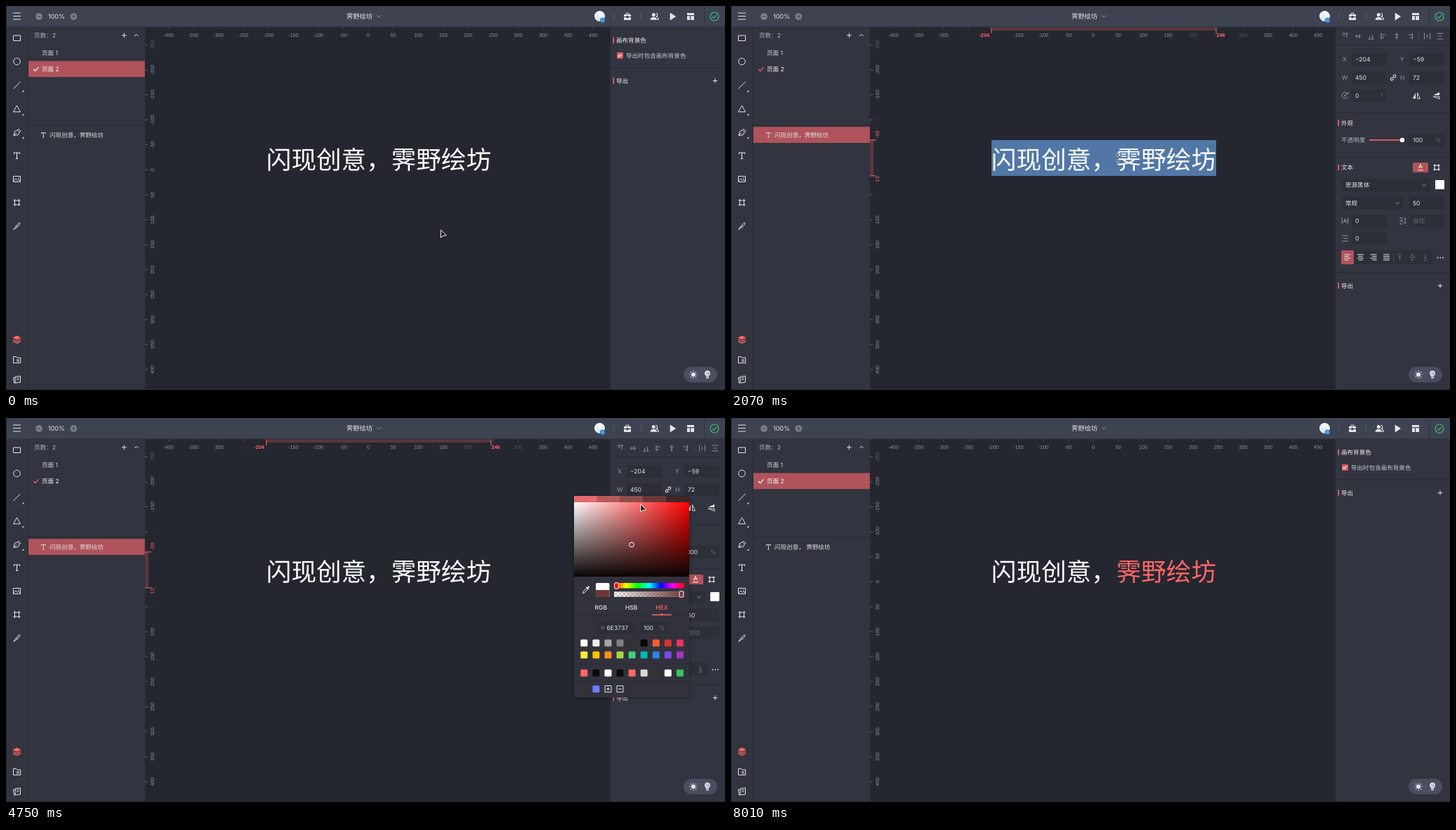
These frames come from a looping animation (1024 by 547 pixels, 8110 ms). An HTML page:

```html
<!DOCTYPE html>
<html lang="zh-CN">
<head>
<meta charset="utf-8">
<title>设计工具演示</title>
<style>
html, body { margin: 0; width: 100%; height: 100%; overflow: hidden; background: #252730; }
svg { position: fixed; inset: 0; width: 100%; height: 100%; display: block; }
text { font-family: Inter, "Noto Sans CJK SC", "Noto Sans CJK", sans-serif; text-rendering: geometricPrecision; white-space: pre; }
.ruler text { font-family: "Liberation Sans", Arial, sans-serif; }
.big { font-family: "Noto Sans CJK SC", "Noto Sans CJK", sans-serif; }
</style>
</head>
<body>
<svg id="stage" viewBox="0 0 1024 547"></svg>
<script>
const LOOP = 8110;
const SLOGAN = '闪现创意，', BRAND = '霁野绘坊';
const RED = '#ff6666', ROW = '#b0535b', PANEL = '#32343f', CANVAS = '#252730';
const FIELD = '#2c2e38', LINE = '#282a33', INK = '#e4e5e9', GREY = '#9698a1', DIM = '#6d707a';
const UNIT = 0.7115, SIZE = 50 * UNIT, ROW_H = 32 * UNIT;
const BOX = { x: 371, y: 191, w: 320, h: 51 };

// Markup helpers
const rect = (x, y, w, h, fill, more = '') => `<rect x="${x}" y="${y}" width="${w}" height="${h}" fill="${fill}" ${more}/>`;
const path = (d, stroke = INK, width = 1, fill = 'none') =>
  `<path d="${d}" stroke="${stroke}" stroke-width="${width}" fill="${fill}" stroke-linejoin="round"/>`;
const solid = (d, fill = INK) => path(d, 'none', 0, fill);
const dot = (x, y, r, fill, more = '') => `<circle cx="${x}" cy="${y}" r="${r}" fill="${fill}" ${more}/>`;
const label = (x, y, s, fill = INK, size = 8.55, more = '') =>
  `<text x="${x}" y="${y}" font-size="${size}" fill="${fill}" ${more}>${s}</text>`;
const at = (x, y, s, more = '') => `<g transform="translate(${x} ${y}) ${more}">${s}</g>`;
const group = (id, s) => `<g id="${id}">${s}</g>`;
const plus = (x, y) => path(`M${x - 3.3} ${y}h6.6M${x} ${y - 3.3}v6.6`);
const chevron = (x, y, dir = 1, c = GREY) => path(`M${x - 2.8} ${y - 1.4 * dir}l2.8 ${2.8 * dir} 2.8 ${-2.8 * dir}`, c);
const tick = (x, y, c, s = 1) => path(`M${x - 3.6 * s} ${y}l${2.6 * s} ${2.7 * s} ${4.8 * s} ${-5.4 * s}`, c, 1.2);
const heading = (y, s) => rect(864.5, y - 4.3, 1.6, 8.4, RED) + label(869, y + 3.2, s, '#f0f0f2', 8.55, 'font-weight="500"');
const rule = (y) => rect(861, y, 163, 1, LINE);

function topBar() {
  const mid = '#7d818d', bar = '#3e4352';
  return rect(0, 0, 1024, 30, bar) + rect(0, 29.5, 1024, 1, '#2a2c36') +
    path('M10 10h11M10 14.5h11M10 19h11') +
    dot(47, 15, 4.8, mid) + path('M44.5 15h5', bar) + label(60, 18.1, '100%', INK, 9) +
    dot(96.3, 15, 4.8, mid) + path('M93.8 15h5M96.3 12.5v5', bar) +
    label(485, 17.9, BRAND, INK, 9.25) + chevron(531, 14.6) +
    dot(845.5, 14.5, 7.5, 'url(#avatar)') + dot(849.6, 20.4, 3.4, '#3f9ff2', `stroke="${bar}" stroke-width=".6"`) +
    rect(865, 10, 1, 10, '#555a68') + rect(904, 10, 1, 10, '#555a68') + rect(994, 0, 1, 30, '#303440') +
    solid('M880 12h10v3h-3.6v-1h-2.8v1H880zM880 16h3.6v1.2h2.8V16h3.6v4h-10z') + path('M883 12v-1.8h4V12') +
    dot(922.3, 12.5, 2.5, INK) + solid('M917.5 19.7c0-5.3 9.6-5.3 9.6 0z') +
    path('M925.5 10.2c3 .3 3 4.2.4 4.8 2.2.5 3.2 2 3.2 4.4h-1.6', INK, 1.1) +
    solid('M945.7 9.6l8.5 5.4-8.5 5.4z') +
    rect(970, 10, 10, 3, INK) + rect(970, 14.2, 4, 5.8, INK) + rect(975.2, 14.2, 4.8, 5.8, INK) +
    dot(1009, 15, 6, 'none', 'stroke="#3dbb70" stroke-width="1.2"') + tick(1009, 15, '#3dbb70', .8);
}

function toolBar() {
  const corner = y => solid(`M25.5 ${y - 3}v3h-3z`, '#c8c9ce');
  return rect(0, 30, 32, 517, PANEL) + rect(31, 30, 1, 517, LINE) +
    path('M10.5 42h10v7.5h-10z') + dot(15.5, 79, 4.8, 'none', `stroke="${INK}"`) +
    path('M10.5 118l10-10') + corner(122.5) + path('M15.5 141.8l5 9h-10z') + corner(156) +
    path('M11 184.5l1.5-6 4-1.7 2.7 2.7-1.8 4zm0 0l4-4M16.3 176.7l1.5-1.6 3.2 3.2-1.6 1.5') + corner(189) +
    path('M11.5 211v-2h8v2M15.5 209v8.5M13.8 217.5h3.4', INK, 1.2) +
    path('M10.5 242.5h10v8h-10zM11 249l3-3 2.5 2.5 1.5-1.5 2.5 2.5') + dot(17.7, 245, .8, INK) +
    path('M12.5 275v10M18.5 275v10M10.5 277h10M10.5 283h10') +
    path('M10.7 318.5l4-5.5 4.3-4.4 1.3 1.3-3.6 4.6zM14.5 313.3l2.2 1.5') +
    solid('M15.5 469.5l6 3-6 3-6-3z', RED) +
    path('M10 475l5.5 2.7 5.5-2.7M10 477.6l5.5 2.7 5.5-2.7', RED, 1.3) +
    path('M10.5 508.5v-9h4l1.2 1.6h5v7.4zM15 504h4M15 506h4') +
    path('M13.2 528l7.3-1v9l-7.3 1zM13 529l-2.5.5 1.2 7.5 1.5-.2M15.2 530l3.3-.4M15.2 532.3l3.3-.4');
}

function layersPanel() {
  const icon = at(53.3, 183.7, path('M-3 -1.5V-3.2H3V-1.5M0 -3.2V3.3M-1.2 3.3H1.2', '#d0d1d6'));
  return rect(32, 30, 166, 517, PANEL) + rect(32, 169, 166, 1, LINE) +
    label(40, 45, '页数：2', '#b4b6be') + plus(168.3, 41.8) + chevron(185.8, 41.6, -1, INK) +
    label(51, 69.6, '页面 1', '#d6d7dc') + rect(32, 78.4, 165.7, ROW_H, ROW, 'id="pageRow"') +
    `<path id="pageTick" d="M39 90l2.6 2.7 4.8-5.4" fill="none" stroke-width="1.2"/>` +
    label(51, 92.8, '页面 2', '#f4f4f6') +
    rect(32, 172.2, 165.7, ROW_H, ROW, 'id="layerRow"') +
    rect(32.5, 172.5, 165, 22, 'none', `id="layerHover" stroke="${RED}"`) +
    icon + label(62, 186.8, '', '#dcdde1', 8.55, 'id="layerName"');
}

function rulers() {
  const x = u => 516 + u * UNIT, y = u => 233.3 + u * UNIT;
  const c = '#8f919a', strip = '#5b373e';
  const range = (a, b) => Array.from({ length: (b - a) / 50 + 1 }, (_, i) => a + 50 * i);
  const mark = (cls, s) => `<g class="${cls}">${s}</g>`;
  const kind = (u, hide, fade) => hide.includes(u) ? 'hide' : fade.includes(u) ? 'fade' : '';
  const side = (py, s, fill) => at(211.3, py, label(0, 0, s, fill, 7.3, 'text-anchor="middle"'), 'rotate(-90)');
  let s = rect(198, 30, 663, 517, CANVAS);
  for (const u of range(-400, 450))
    s += rect(x(u) - .5, 30, 1, 3.5, '#4b4e59') +
      mark(kind(u, [-250, -200, 250], [200, 300]), label(x(u), 43.8, u, c, 7.3, 'text-anchor="middle"'));
  for (const u of range(-250, 400))
    s += rect(198, y(u) - .5, 4, 1, '#5b5e69') +
      mark(kind(u, [-100, -50, 0, 50], []), `<g opacity="${u < -200 ? .5 : 1}">${side(y(u), u, c)}</g>`);
  const chosen = rect(371, 30, 320, 5, strip) + rect(370.4, 30, 1, 9, RED) + rect(690.4, 30, 1, 9, RED) +
    label(368, 43.8, '-204', RED, 7.3, 'text-anchor="end" font-weight="700"') +
    label(691.5, 43.8, '246', RED, 7.3, 'font-weight="700"') +
    rect(198, 191, 5, 51, strip) + rect(198, 190.4, 9, 1, RED) + rect(198, 241.4, 9, 1, RED) +
    side(183, '-59', RED) + side(246.5, '13', RED);
  return `<g class="ruler">${s}${group('rulerSel', chosen)}</g>`;
}

function pagePanel() {
  return heading(49, '画布背景色') + rect(870, 66, 9, 9, '#e35c62', 'rx="1.5"') + tick(874, 70.5, '#fff', .65) +
    label(883, 73.6, '导出时包含画布背景色', '#c6c8ce') + rule(87.5) + heading(106.5, '导出') + plus(1010, 106.5);
}

function field(x, y, s, w = 50, fill = INK) {
  return rect(x, y - 9, w, 18, FIELD, 'rx="1.5"') + label(x + 5, y + 3.1, s, fill);
}

function alignIcon(x, y, i, c) {
  const off = [0, 1.5, 3, 0][i];
  return path([9, 6, 9, 6].map((w, k) => `M${x - 4.5 + (w === 6 && i < 3 ? off : 0)} ${y - 4 + 2.6 * k}h${i === 3 ? 9 : w}`).join(''), c);
}

function textPanel() {
  const bars = [875, 893, 911.5, 930, 948, 966.5].map((x, i) => {
    const e = [-4, 0, 4][i % 3], a = [0, -3, -6][i % 3], b = [0, -2, -4][i % 3];
    const d = `M${e} -4.5V4.5M${e + a} -2h6M${e + b} 2h4`;
    return at(x, 43, path(d, '#8b8d97', 1.1), i < 3 ? 'rotate(90)' : '');
  }).join('');
  const spread = path('M-4 -4.5v9M4 -4.5v9M0 -2.5v5', '#8b8d97', 1.1);
  const small = 'M-4.3 -4v8M4.3 -4v8M-2.3 3L0 -3 2.3 3M-1.5 1h3';
  const vert = 'M-3 -4h6M0 4v-6M-2 0l2-2 2 2';
  return bars + rect(979, 38, 1, 10, '#454853') + at(991.5, 43, spread) + at(1010, 43, spread, 'rotate(90)') + rule(55) +
    label(871, 79.3, 'X', GREY) + field(884, 76, '−204') + label(953, 79.3, 'Y', GREY) + field(966, 76, '−59') +
    label(870, 105, 'W', GREY) + field(884, 102, '450') + label(953, 105, 'H', GREY) + field(966, 102, '72') +
    at(943, 102, path('M-1 -1.5h-2a1.7 1.7 0 0 0 0 3.4h2M1 -1.7h2a1.7 1.7 0 0 1 0 3.4h-2M-2 0h4', INK, 1.1), 'rotate(-45)') +
    path('M878.3 125a4.4 4.4 0 1 0 .3 4M878.8 122.5v3h-3', GREY) + dot(874.5, 127.6, 1.2, GREY) +
    field(884, 127.5, '0') + label(925, 130.8, '°', DIM) +
    solid('M971 132l4-8.5v8.5z') + path('M977.5 123.5v8.5h4z', INK, .9) +
    solid('M1009 127l-9 0 9-4z') + path('M1000 129h9v3.5z', INK, .9) +
    rule(151.5) + heading(166.5, '外观') + label(869, 194, '不透明度', '#b4b6be') +
    rect(909, 190.2, 47, 1.6, RED) + dot(956, 191, 3.2, '#fff') + field(966, 191, '100') + label(1003, 194, '%', DIM) +
    rule(215) + heading(230, '文本') + rect(971, 223, 22, 14, ROW, 'rx="1.5"') +
    path('M979.5 231l2.4-5.5 2.4 5.5M980.3 229.3h3.2M978 233.7h8', '#fff', .9) +
    path('M1002 227h6v6h-6z') + [[1002, 227], [1008, 227], [1002, 233], [1008, 233]].map(([x, y]) => rect(x - 1.2, y - 1.2, 2.4, 2.4, INK)).join('') +
    field(870, 255, '思源黑体', 126) + chevron(987, 255) + rect(1003, 248, 13, 13, '#fff', 'id="fillSwatch" rx="1"') +
    field(870, 280.5, '常规', 87) + chevron(949, 281) + field(966, 280.5, '50') +
    at(874.5, 306, path(small, GREY)) + field(884, 306, '0') +
    path('M952 301.5h5M952 310.5h5M953 308.5l2-5 2 5M960 302v8M958.7 303.3l1.3-1.3 1.3 1.3M958.7 308.7l1.3 1.3 1.3-1.3', GREY, .9) +
    field(966, 306, '自动', 50, DIM) +
    path('M870 327h9M873 331h6M870 335h9M870 331h1.5', GREY) + field(884, 331, '0') +
    rect(869, 348, 130, 20, FIELD, 'rx="1.5"') + rect(869, 348, 18, 20, ROW, 'rx="1.5"') +
    [878, 896.5, 915, 933.5].map((x, i) => alignIcon(x, 358, i, INK)).join('') + rect(943, 352, 1, 12, '#454853') +
    at(952.5, 358, path(vert, DIM)) + at(970.5, 358, path('M-4 0h8M0 -5v3M0 5v-3M-1.5 -3.5L0 -2l1.5-1.5M-1.5 3.5L0 2l1.5 1.5', DIM)) +
    at(989, 358, path(vert, DIM), 'rotate(180)') +
    [1006.5, 1010.3, 1014].map(x => dot(x, 358.5, .9, INK)).join('') +
    rule(379.5) + heading(398.5, '导出') + plus(1010, 398.5);
}

function picker() {
  const swatches = (y, list) => list.split(' ').map((c, i) => rect(818.3 + 24 * UNIT * i, y - 5, 10, 10, '#' + c, 'rx="1.5"')).join('');
  const shades = ['#e36b6b', '#b85a5a', '#914c4c', '#6e3737', '#442626'];
  const thumb = (x, y, fill, id) => rect(x - 2.8, y - 4.2, 5.6, 8.4, fill, `rx="1" stroke="#fff" ${id}`);
  const box = x => path(`M${x - 4.5} 381.5h9v9h-9z`) + path(`M${x - 2.5} 386h5`);
  return rect(809, 111, 164, 287, '#30323d', 'rx="2" filter="url(#shade)"') +
    shades.map((c, i) => rect(809 + 32.8 * i, 111, 32.9, 9, c)).join('') +
    rect(809, 120, 164, 106, 'url(#sat)') + rect(809, 120, 164, 106, 'url(#val)') +
    `<circle id="marker" r="3.4" fill="none" stroke="#fff"/>` +
    path('M821.5 249.5l.6-2.4 4.6-4.6 1.8 1.8-4.6 4.6z') + solid('M825.8 241.6l1-1 .8.7 1.4-1.5c1.4-1 2.6.4 1.8 1.6l-1.5 1.5.8.8-1 1z') +
    rect(840, 235, 19.5, 20, '#fff', 'rx="2"') + `<path id="now" d="M840 245h19.5v8a2 2 0 0 1-2 2h-15.5a2 2 0 0 1-2-2z"/>` +
    rect(866, 235, 100, 7.5, 'url(#hue)') + thumb(869.5, 239, '#f00', '') +
    rect(866, 247.3, 100, 7.5, 'url(#check)') + rect(866, 247.3, 100, 7.5, 'url(#alpha)') + thumb(962, 251, '#6e3737', 'id="alphaThumb"') +
    ['RGB', 'HSB', 'HEX'].map((s, i) => label(847.3 + 43.4 * i, 273, s, i < 2 ? INK : RED, 8.55, 'text-anchor="middle" font-weight="500"')).join('') +
    rect(809, 280.5, 164, 1, LINE) + rect(920, 279.6, 28, 1.6, RED) + solid('M932 280l2-2 2 2z', RED) +
    rect(841, 290, 55, 17, FIELD, 'rx="1.5"') + label(847, 301.6, '#', DIM) + label(855.5, 301.6, '', INK, 8.55, 'id="hex"') +
    rect(903, 290, 39, 17, FIELD, 'rx="1.5"') + label(908, 301.6, '100') + label(930, 301.6, '%', DIM) +
    swatches(320.5, 'ffffff ededed a6a6a6 808080 333333 0c0808 ff5a2b d6332f e8385f') +
    swatches(337.6, 'ffeb3b ffc300 ff8d1a a5d63f 43cf7c 00baad 2a82e4 7948ea ac33c1') + rect(809, 350, 164, 1, LINE) +
    swatches(363.2, 'ff6666 0c0808 ffffff 0c0808 ff6666 d8d8d8 333333 ffffff 34c759') + rect(809, 374.5, 164, 1, LINE) +
    swatches(386, '333333 6b7cff') + box(857.5) + path('M857.5 383.5v5') + box(874.5);
}

function themePill() {
  const rays = Array.from({ length: 8 }, (_, i) => at(979, 525, path('M0 -4.3v-1.5', INK, 1.2), `rotate(${45 * i})`)).join('');
  return rect(965, 514, 48, 22, '#494e60', 'rx="11"') + rays + dot(979, 525, 3.1, INK) +
    dot(999, 523.3, 4, '#d6d8df') + rect(997, 526, 4, 4.6, '#d6d8df', 'rx="1"') + path('M997 528.3h4M997.6 522.5l1.4 1.2 1.4-1.2v3', '#6d7180', .7);
}

function cursors() {
  const arrow = path('M.3 0V11L3.3 8.3L8.2 7.8Z', '#fff', 1, '#111');
  const move = at(7, 14.3, path('M0 -5l2 2h-1.2v2.2h2.2v-1.2l2 2-2 2v-1.2h-2.2v2.2h1.2l-2 2-2-2h1.2v-2.2h-2.2v1.2l-2-2 2-2v1.2h2.2v-2.2h-1.2z', '#fff', 1.1, '#222'));
  const beam = 'M-2.3 -5.5Q0 -5.5 0 -4V4Q0 5.5 -2.3 5.5M2.3 -5.5Q0 -5.5 0 -4M0 4Q0 5.5 2.3 5.5M-1.5 .8h3';
  const hand = 'M-1.2 .5c0-1.6 2-1.6 2.1 0l.4 4 .6-.2c.6-.7 1.7-.3 1.8.4.8-.5 1.7 0 1.8.7 1-.3 1.6.2 1.6 1.2 0 2.2-.9 3.2-1.2 5.4H.5C-.4 10-2.6 8.6-3.3 7.2c-.5-1.2.9-1.7 1.7-.8l.8.8z';
  return group('arrow', arrow) + group('move', arrow + move) +
    group('beam', path(beam, '#fff', 2.2) + path(beam, '#222', 1)) + group('hand', path(hand, '#222', .8, '#fff'));
}

const stop = (o, c, a = 1) => `<stop offset="${o}" stop-color="${c}" stop-opacity="${a}"/>`;
const grad = (id, stops, vertical) => `<linearGradient id="${id}" ${vertical ? 'x2="0" y2="1"' : ''}>${stops}</linearGradient>`;
const defs = '<defs>' +
  grad('avatar', stop(0, '#fbfdfe') + stop(1, '#cfe4f0'), true) +
  grad('sat', stop(0, '#fff') + stop(1, '#f00')) +
  grad('val', stop(0, '#0a0504', 0) + stop(1, '#0a0504'), true) +
  grad('hue', [0, 60, 120, 180, 240, 300, 360].map(h => stop(h / 360, `hsl(${h} 100% 50%)`)).join('')) +
  grad('alpha', stop(0, '#6e3737', 0) + stop(1, '#6e3737')) +
  `<pattern id="check" width="6" height="6" patternUnits="userSpaceOnUse">${rect(0, 0, 6, 6, '#fff')}${rect(0, 0, 3, 3, '#ccc')}${rect(3, 3, 3, 3, '#ccc')}</pattern>` +
  '<filter id="shade" x="-10%" y="-10%" width="120%" height="120%"><feDropShadow dx="0" dy="1" stdDeviation="3" flood-color="#000" flood-opacity=".35"/></filter></defs>';

const handles = [[371, 191], [691, 191], [371, 242], [691, 242]]
  .map(([x, y]) => rect(x - 2.5, y - 2.5, 5, 5, '#fff', `stroke="${RED}"`)).join('');

const textX = 516 - 204 * UNIT, textY = 232.2;
document.getElementById('stage').innerHTML = defs + rulers() +
  rect(0, BOX.y, 0, BOX.h, '#5177a7', 'id="highlight"') +
  label(textX, textY, SLOGAN, '#fff', SIZE, 'class="big"') +
  label(textX + 5 * SIZE, textY, BRAND, '#fff', SIZE, 'class="big" id="brand"') +
  rect(371, 231.2, 320, 1.6, '#d9565c', 'id="underline"') +
  group('frame', rect(BOX.x, BOX.y, BOX.w, BOX.h, 'none', `stroke="${RED}"`) + handles) +
  topBar() + toolBar() + layersPanel() +
  rect(860, 30, 164, 517, PANEL) + rect(860, 30, 1, 517, LINE) +
  group('pagePanel', pagePanel()) + group('textPanel', textPanel()) + group('picker', picker()) + themePill() +
  rect(0, 0, 1, 547, '#262934') + rect(0, 546, 1024, 1, '#262934') + group('cursor', cursors());

// The screen refreshes in bursts: start, end, number of steps
const BURSTS = [[450, 1490, 7], [1630, 2070, 4], [2370, 3410, 8], [3560, 3860, 3], [4150, 5050, 7], [5200, 6110, 7], [6620, 7520, 7]];
const TRAIL = [
  [0, 619, 319], [450, 616, 314], [970, 570, 226], [1150, 568, 226], [1490, 563, 234], [1630, 558, 226], [2070, 551, 216],
  [2370, 549, 216], [2520, 549, 217], [2964, 692, 222], [3410, 1026, 236], [3560, 1014, 245], [3860, 1006, 254],
  [4150, 1006, 254], [4450, 896, 184], [4600, 891, 180], [4750, 903.5, 123], [4900, 907, 122], [5050, 907, 122],
  [5200, 866, 134], [5503, 730, 177], [5958, 720.5, 176], [6110, 720, 165], [6620, 726, 170], [7370, 992, 528], [7520, 1012, 562]
];

function snap(t) {
  let held = 0;
  for (const [a, b, n] of BURSTS) {
    if (t + 20 < a) break;
    const step = (b - a) / (n - 1);
    held = a + step * Math.min(n - 1, Math.floor((t + 20 - a) / step));
  }
  return held;
}

function follow(t) {
  const i = TRAIL.findIndex(k => k[0] > t);
  if (i < 0) return TRAIL[TRAIL.length - 1].slice(1);
  const [a, ax, ay] = TRAIL[i - 1], [b, bx, by] = TRAIL[i], k = (t - a) / (b - a);
  return [ax + (bx - ax) * k, ay + (by - ay) * k];
}

const $ = id => document.getElementById(id);
const show = (id, on) => $(id).style.display = on ? '' : 'none';
const set = (id, attrs) => Object.entries(attrs).forEach(([k, v]) => $(id).setAttribute(k, v));
const within = (t, a, b) => t >= a && t < b;
const marks = [...document.querySelectorAll('.hide, .fade')];

function draw(time) {
  const t = snap(time), [x, y] = follow(t);
  const selected = within(t, 1140, 5640), hover = within(t, 960, 1140), tinted = t >= 4890;

  for (const id of ['rulerSel', 'textPanel', 'layerRow']) show(id, selected);
  for (const id of ['pagePanel', 'pageRow']) show(id, !selected);
  for (const m of marks) m.style.opacity = !selected ? 1 : m.classList.contains('fade') ? .4 : .06;
  set('pageTick', { stroke: selected ? RED : '#fff' });
  show('layerHover', hover);
  show('underline', hover);
  show('frame', within(t, 1140, 1600) || within(t, 5500, 5640));
  $('layerName').textContent = SLOGAN + (tinted ? ' ' : '') + BRAND;
  set('brand', { fill: tinted ? RED : '#fff' });
  set('fillSwatch', { fill: tinted ? RED : '#fff' });

  const start = t < 2300 ? 371 : 549;
  const end = t < 2300 ? 691 : Math.min(691, Math.max(549, x));
  show('highlight', within(t, 1620, 4140));
  set('highlight', { x: start, width: end - start });

  show('picker', within(t, 4140, 5490));
  const [hex, mx, my] = tinted ? ['FF6666', 907, 122] : t >= 4590 ? ['6E3737', 891, 180.5] : ['FFFFFF', 810, 121];
  set('marker', { cx: mx, cy: my });
  set('now', { fill: '#' + hex });
  set('alphaThumb', { fill: '#' + hex });
  document.querySelectorAll('#alpha stop').forEach(s => s.setAttribute('stop-color', '#' + hex));
  $('hex').textContent = hex;

  const pointer = within(t, 960, 1620) ? 'move' : within(t, 1620, 3000) ? 'beam' : within(t, 3500, 4290) ? 'hand' : 'arrow';
  for (const id of ['arrow', 'move', 'beam', 'hand']) show(id, id === pointer);
  set('cursor', { transform: `translate(${x} ${y})` });
}

const begin = performance.now();
function loop() {
  draw((performance.now() - begin) % LOOP);
  requestAnimationFrame(loop);
}
loop();
</script>
</body>
</html>
```
